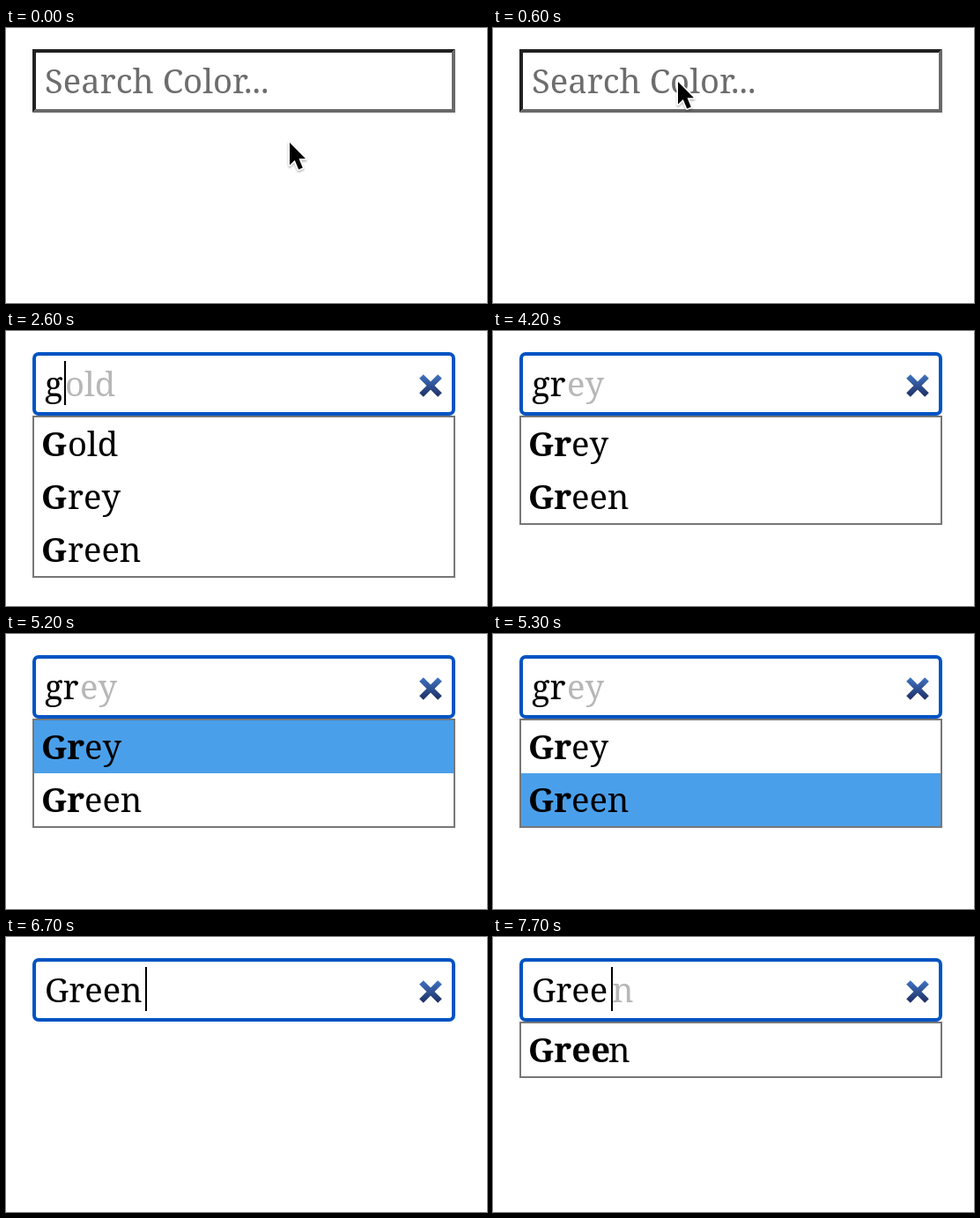
An HTML page that plays this animation: 546 px wide and 312 px high, repeating every 8000 ms.

```html
<!DOCTYPE html>
<html lang="en">
<head>
<meta charset="utf-8">
<title>Color search</title>
<style>
  html, body { margin: 0; width: 100%; height: 100%; overflow: hidden; background: #fff; }
  svg { display: block; width: 546px; height: 312px; }
  text { font: 38.2px "Noto Serif", serif; white-space: pre; }
  .hint { fill: #6d6d6d; }
  .ghost { fill: #b7b7b7; }
  .match { font-weight: 700; }
</style>
</head>
<body>
<svg viewBox="0 0 546 312">
  <defs>
    <linearGradient id="ink" gradientUnits="userSpaceOnUse" x1="0" y1="48" x2="0" y2="76">
      <stop offset="0" stop-color="#4278c8"/>
      <stop offset="1" stop-color="#1c2a5e"/>
    </linearGradient>
    <filter id="shade" x="-50%" y="-50%" width="200%" height="200%">
      <feDropShadow dx="0" dy="1.5" stdDeviation="1.2" flood-opacity=".35"/>
    </filter>
  </defs>
  <g id="idle">
    <path d="M30 24H510L506 28H34V92L30 96Z" fill="#212121"/>
    <path d="M510 24V96H30L34 92H506V28Z" fill="#696969"/>
  </g>
  <rect id="focus" x="32" y="26" width="476" height="68" rx="5" fill="#fff" stroke="#0053c3" stroke-width="4"/>
  <text id="hint" class="hint" x="44" y="74">Search Color...</text>
  <text id="query" x="44" y="74"></text>
  <text id="ghost" class="ghost" y="74"></text>
  <path id="clear" d="M471.5 51.5L492.5 72.5M492.5 51.5L471.5 72.5" stroke="url(#ink)" stroke-width="6.5"/>
  <rect id="caret" y="34" width="2" height="50"/>
  <g id="list">
    <rect id="frame" x="31" y="97" width="478" fill="#fff" stroke="#777" stroke-width="2"/>
    <rect id="mark" x="32" width="476" height="60" fill="#4a9fea"/>
    <g id="rows"></g>
  </g>
  <path id="mouse" d="M0 0V25.5L5.8 20L10.2 30.4L14.8 28.4L10.5 18.3H18Z" stroke="#fff" stroke-width="3"
    stroke-linejoin="round" paint-order="stroke" filter="url(#shade)"/>
</svg>
<script>
const LOOP = 8000;
const $ = id => document.getElementById(id);

// time, x, y
const mousePath = [
  [0, 322, 130], [100, 298, 90], [300, 245, 88], [400, 205, 85], [500, 208, 64], [600, 210, 61]
];
// time, field state, highlighted row
const fieldSteps = [
  [0, "idle", -1], [700, "empty", -1], [1700, "g", -1], [2700, "gr", -1],
  [4400, "gr", 0], [5300, "gr", 1], [5700, "Green", -1], [7600, "Gree", -1]
];
// time, caret visible
const blink = [
  [0, 0], [700, 1], [1100, 0], [1600, 1], [2100, 0], [2600, 1], [3200, 0], [3700, 1],
  [4200, 0], [4700, 1], [5200, 0], [5700, 1], [6200, 0], [6700, 1], [7200, 0], [7600, 1]
];
// caret: x in the field, rest: x where the unmatched part of an option begins
const states = {
  idle: { text: "", ghost: "", caret: 45, options: [] },
  empty: { text: "", ghost: "", caret: 45, options: [] },
  g: { text: "g", ghost: "old", caret: 66, rest: 70, options: ["Gold", "Grey", "Green"] },
  gr: { text: "gr", ghost: "ey", caret: 83, rest: 89, options: ["Grey", "Green"] },
  Green: { text: "Green", ghost: "", caret: 158, options: [] },
  Gree: { text: "Gree", ghost: "n", caret: 134, rest: 131, options: ["Green"] }
};

const at = (steps, t) => steps.findLast(s => s[0] <= t);
const show = (id, on) => $(id).setAttribute("visibility", on ? "visible" : "hidden");

function drawField(name, row) {
  const { text, ghost, caret, rest, options } = states[name];
  const n = text.length;
  show("idle", name === "idle");
  show("focus", name !== "idle");
  show("hint", !n);
  show("clear", n);
  $("query").textContent = text;
  $("ghost").textContent = ghost;
  $("ghost").setAttribute("x", caret + 1);
  $("caret").setAttribute("x", caret);

  $("list").style.display = options.length ? "" : "none";
  $("frame").setAttribute("height", options.length * 60 + 2);
  $("mark").style.display = row < 0 ? "none" : "";
  $("mark").setAttribute("y", 98 + row * 60);
  $("rows").innerHTML = options.map((word, i) =>
    `<text y="${142 + i * 60}"><tspan class="match" x="40">${word.slice(0, n)}</tspan>` +
    `<tspan x="${rest}">${word.slice(n)}</tspan></text>`).join("");
}

let drawn = "";
function frame() {
  const t = performance.now() % LOOP;
  const [, name, row] = at(fieldSteps, t);
  if (drawn !== name + row) {
    drawField(name, row);
    drawn = name + row;
  }
  const [, x, y] = at(mousePath, t);
  $("mouse").setAttribute("transform", `translate(${x} ${y})`);
  show("mouse", t < 1700);
  show("caret", at(blink, t)[1]);
  requestAnimationFrame(frame);
}
frame();
</script>
</body>
</html>
```
